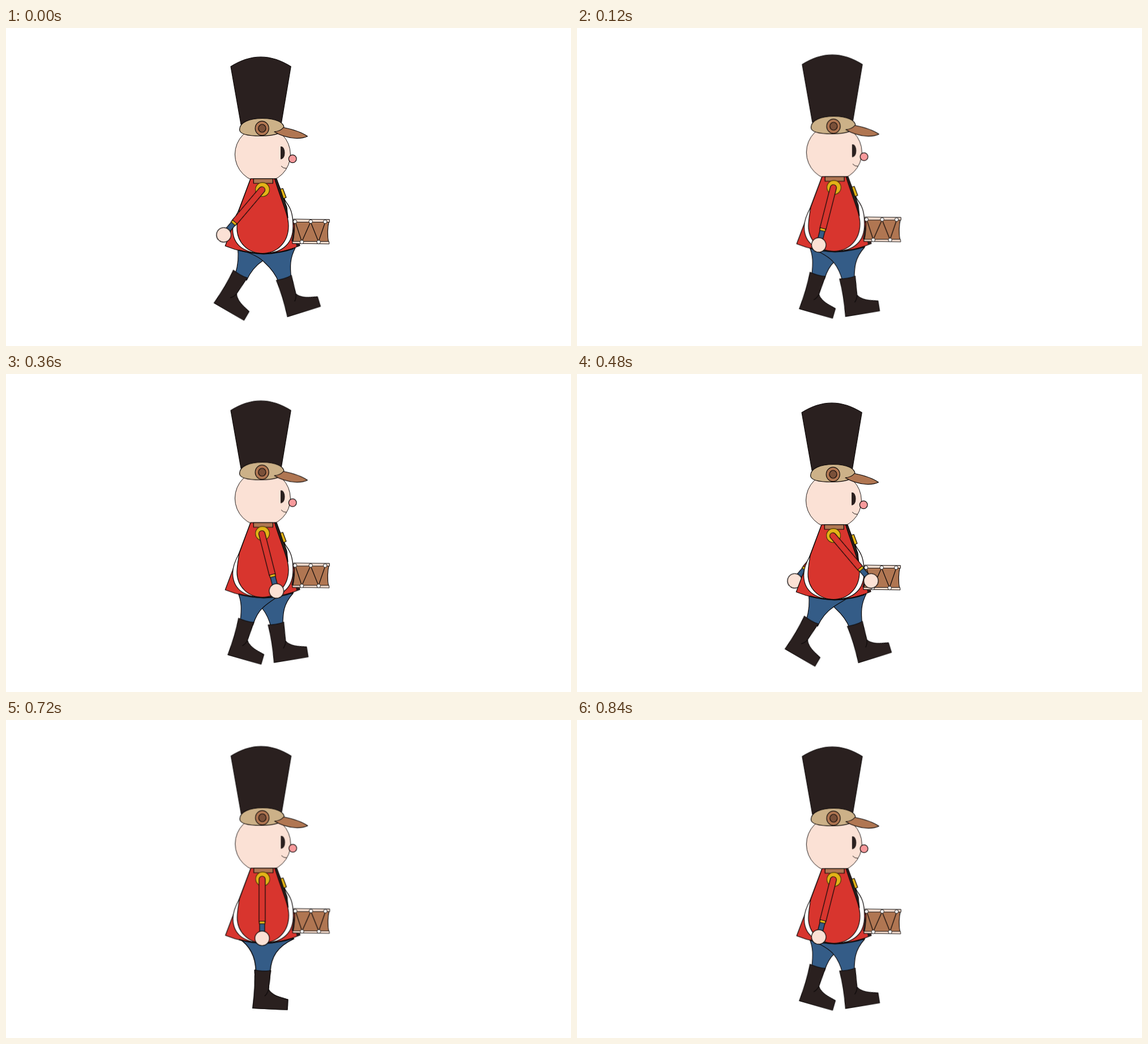
Recreate the animation shown at these times as an HTML page. Size 998x561 px, loop 960 ms.

```html
<!DOCTYPE html>
<html lang="en">
<head>
<meta charset="utf-8">
<title>Marching drummer</title>
<style>
  html, body { margin: 0; width: 100%; height: 100%; overflow: hidden; background: #fff; }
  svg { display: block; width: 100vw; height: 100vh; }
  svg * { stroke-linejoin: round; }

  .ink { stroke: #0c0808; stroke-width: 1.2; }
  .line { fill: none; }
  .red { fill: #d8352e; }
  .blue { fill: #345c87; }
  .skin { fill: #fbe1d5; }
  .gold { fill: #e3b417; }
  .brown { fill: #b07652; }
  .dark { fill: #2a201f; }
  .white { fill: #fff; }

  .sway, .bob, .arm, .thigh, .boot { animation: 960ms step-end infinite; }
  .sway { animation-name: sway; }
  .bob { animation-name: bob; }
  .arm { animation-name: swing; transform-origin: 452px 285.5px; }
  .thigh { animation-name: thigh; }
  .boot { animation-name: boot; }
  .far .thigh, .far .boot, .far.arm { animation-delay: -480ms; }

  @keyframes sway {
    0%, 37.5%, 100% { transform: translateX(0); }
    12.5%, 87.5% { transform: translateX(.8px); }
    25%, 75% { transform: translateX(.4px); }
  }
  @keyframes bob {
    0%, 50%, 100% { transform: translateY(0); }
    12.5%, 37.5%, 62.5%, 87.5% { transform: translateY(-3.7px); }
    25%, 75% { transform: translateY(-4.5px); }
  }
  @keyframes swing {
    0%, 100% { transform: rotate(40.3deg); }
    12.5%, 87.5% { transform: rotate(14.3deg); }
    25%, 75% { transform: rotate(0); }
    37.5%, 62.5% { transform: rotate(-14.3deg); }
    50% { transform: rotate(-40.3deg); }
  }
  @keyframes thigh {
    0%, 100% { d: path("M412 390C430 397 447 403 457 414C468 424 477 436 482 449L504 443C501 420 502 405 511 388Z"); }
    12.5%, 87.5% { d: path("M411 388C431 396 445 404 453 414C460 423 465 434 468 446L489 443C489 422 490 406 507 387Z"); }
    25%, 75% { d: path("M409 384C428 396 441 415 441 444L466 444C468 418 478 400 508 386Z"); }
    37.5%, 62.5% { d: path("M490 386C471 399 462 404 454 412C447 418 441 428 436 443L414 435C416 416 417 402 409 384Z"); }
    50% { d: path("M490 388C470 401 461 405 453 411C441 419 432 430 425 445L405 434C411 415 411 400 409 386Z"); }
  }
  @keyframes boot {
    0%, 100% { transform: translate(477.5px, 445px) rotate(-17deg); }
    12.5%, 87.5% { transform: translate(463px, 442.5px) rotate(-9deg); }
    25%, 75% { transform: translate(439px, 441px) rotate(3deg); }
    37.5%, 62.5% { transform: translate(410.8px, 430.7px) rotate(16.3deg); }
    50% { transform: translate(401.7px, 427px) rotate(30.5deg); }
  }
</style>
</head>
<body>
<svg viewBox="0 0 998 561">
  <defs>
    <g id="armShape" class="ink">
      <rect class="blue" x="447.5" y="360" width="9" height="22"/>
      <path class="red" d="M446.5 361V285.5a5.5 5.5 0 0 1 11 0V361Z"/>
      <rect class="gold" x="447" y="359.5" width="10" height="4.5"/>
      <circle class="skin" cx="452" cy="389.7" r="12.8"/>
    </g>
    <g id="bootShape" class="ink">
      <path class="dark" d="M0 0Q15 2.5 28 -.5L26 33C32 43 47 46 61 49V67L0 67.5Q3 30 0 0Z"/>
      <path class="line" d="M26 33Q25 40 20 45"/>
    </g>
  </defs>

  <g class="sway">
    <g class="bob"><g class="arm far"><use href="#armShape"/></g></g>

    <g class="far">
      <path class="thigh blue ink"/>
      <g class="boot"><use href="#bootShape"/></g>
    </g>
    <g>
      <path class="thigh blue ink"/>
      <g class="boot"><use href="#bootShape"/></g>
    </g>

    <g class="bob ink">
      <!-- head -->
      <circle class="skin" cx="453.4" cy="223" r="49" stroke-width=".9"/>
      <circle cx="506.2" cy="230.8" r="6.9" fill="#f79a9c"/>
      <path class="dark" stroke="none" d="M485 209H486.5A6 11.2 0 0 1 486.5 231.4H485Z"/>
      <path class="line" stroke-width=".9" d="M486 243.5Q490 248 495 247.5"/>

      <!-- hat -->
      <path class="dark" d="M397 68Q450 34 503.2 68L486 170H415Z"/>
      <path fill="#ccb188" d="M412.5 179C413 166 430 159.5 453 159.5C478 159.5 490 167 491 175C489 186 476 190 450 190.5C426 190.5 412.5 187 412.5 179Z"/>
      <path class="brown" d="M474 183Q485 182 490 175.5Q518 181 532.500 191Q525 195 511 194.500Q490 193 474 183Z"/>
      <ellipse class="brown" cx="452.2" cy="177" rx="12" ry="12.6"/>
      <ellipse cx="452.4" cy="177" rx="6.6" ry="7" fill="#7a5039"/>

      <!-- coat -->
      <path class="red" d="M432 266H477L506 335L519 384Q490 397 455 398.5Q418 397 387.2 384.5Z"/>
      <path class="white" d="M412 320C405 332 400.500 343 400.500 355C400.500 381 418 397 455 398C490 397 507 379 507 350C507 327 503 316 490 301L470 300Z"/>
      <path class="dark" d="M474 266H478L496 316L498 335L493 330Z"/>
      <path class="red" stroke="none" d="M432 266H474.5C488 310 499 330 499 349C499 378 479 397.5 453 397.5C427 397.5 408 378 408 353C408 343 410 333 412 320Z"/>
      <path class="line" d="M474.5 266C488 310 499 330 499 349C499 378 479 397.5 453 397.5C427 397.5 408 378 408 353C408 343 410 333 412 320L432 266H477"/>
      <path class="line" stroke-width="2" d="M411 392Q430 397 455 398.5Q485 397 508 389"/>
      <path class="dark" d="M506 336Q509 358 504 376L517 381L519 384L513 386Z" stroke="none"/>
      <path class="gold" d="M484.5 284.5L489 283L495 299L490 301Z"/>
      <rect class="brown" x="437.3" y="266" width="34" height="8"/>
      <circle class="gold" cx="453" cy="285" r="12.4" stroke="#4c3a08"/>

      <!-- drum -->
      <path class="brown" d="M509 338H571Q566 359 570 380H506Q511 359 509 338Z"/>
      <path fill="#f0d9cb" d="M508 337L571.5 338V342.5H509ZM506 376.5H570.5L571 381L506 380Z" stroke-width=".9"/>
      <path class="line" d="M511 342L522.5 377L538 342L552 377L564 342"/>
      <g class="white" stroke-width=".9">
        <circle cx="510.5" cy="341.5" r="3.2"/>
        <circle cx="538.2" cy="341.5" r="3.2"/>
        <circle cx="563.7" cy="341.8" r="3.2"/>
        <circle cx="522.5" cy="377.5" r="3.2"/>
        <circle cx="552.2" cy="377.5" r="3.2"/>
      </g>
    </g>

    <g class="bob"><g class="arm"><use href="#armShape"/></g></g>
  </g>
</svg>
</body>
</html>
```
